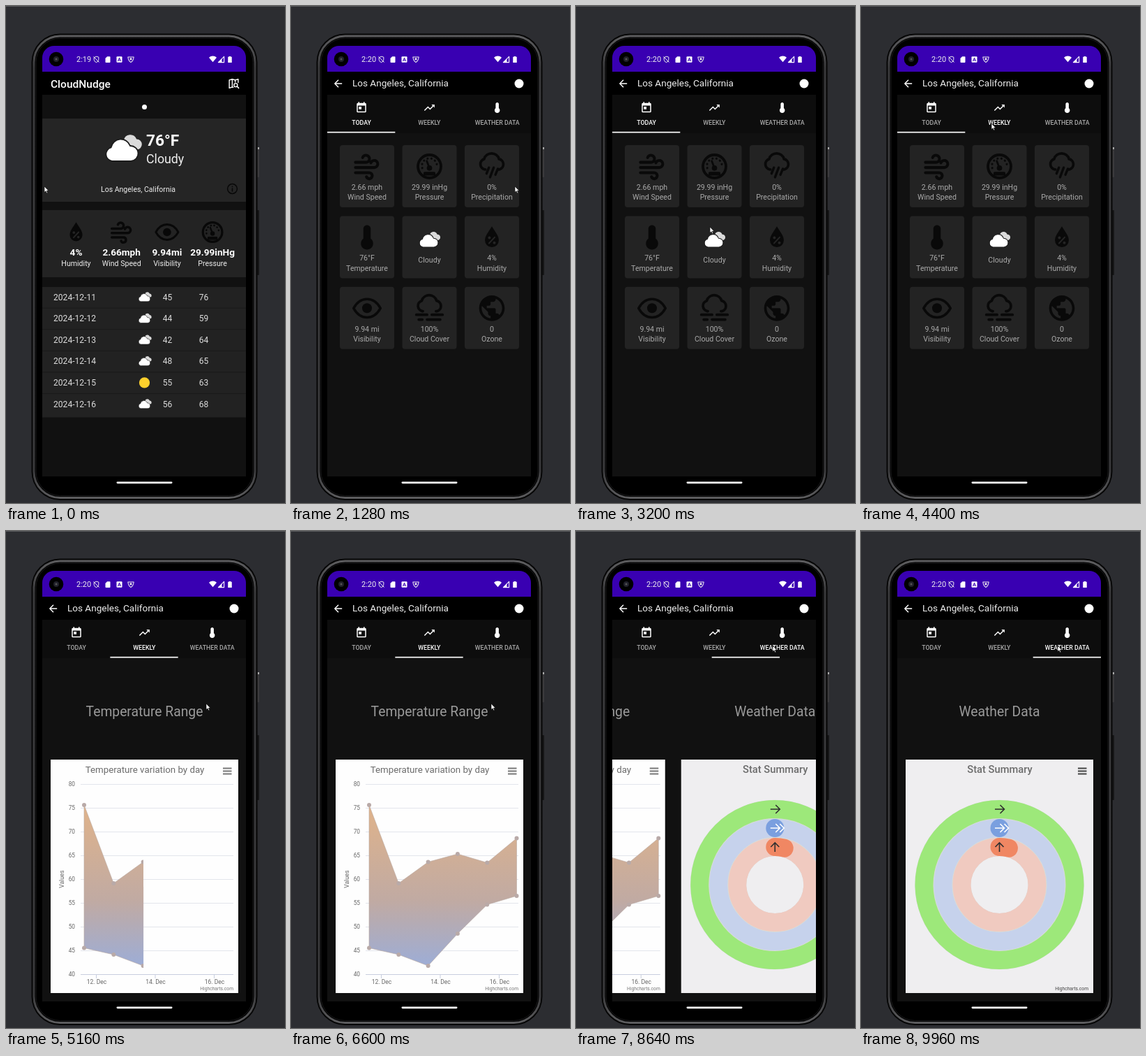
Write an HTML page that moves like this. It is 400 by 711 pixels and loops after 10000 ms.

```html
<!DOCTYPE html>
<html lang="en">
<head>
<meta charset="utf-8">
<title>Weather</title>
<style>
html, body { margin: 0; width: 100%; height: 100%; overflow: hidden; background: #2c2d31; }
svg { display: block; width: 100vw; height: 100vh; }
text { font-family: Roboto, sans-serif; }
</style>
</head>
<body>
<svg id="stage" viewBox="0 0 400 711" xmlns="http://www.w3.org/2000/svg"></svg>
<script>
const PAGE = 292, TAB = PAGE / 3, LOOP = 10000;
const CLICK = [4420, 8540];
const $ = id => document.getElementById(id);

// --- drawing helpers ---
const rect = (x, y, w, h, fill, rx = 0, more = '') =>
  `<rect x="${x}" y="${y}" width="${w}" height="${h}" rx="${rx}" fill="${fill}" ${more}/>`;
const circle = (x, y, r, fill, more = '') => `<circle cx="${x}" cy="${y}" r="${r}" fill="${fill}" ${more}/>`;
const text = (x, y, size, str, fill = '#eee', anchor = 'middle', weight = 400, more = '') =>
  `<text x="${x}" y="${y}" font-size="${size}" fill="${fill}" text-anchor="${anchor}" font-weight="${weight}" ${more}>${str}</text>`;
const line = (d, color, width = 1) =>
  `<path d="${d}" fill="none" stroke="${color}" stroke-width="${width}"/>`;
const at = (x, y, s, body) =>
  `<g transform="translate(${x} ${y}) scale(${s}) translate(-12 -12)" stroke-linecap="round" stroke-linejoin="round">${body}</g>`;
const solid = d => c => `<path d="${d}" fill="${c}" fill-rule="evenodd"/>`;

// --- icons on a 24 x 24 grid ---
const shield = 'M12 2L4 5v6c0 5 3.4 9.7 8 11 4.6-1.3 8-6 8-11V5z';
const cloudLine = 'M6.5 14.5H6a4.5 4.500 0 0 1-.5-8.700 6.500 6.500 0 0 1 12.500 0 4.500 4.500 0 0 1 .5 8.700H17.500';
const icon = {
  wind: c => line('M1.500 8.300h9.500a3.200 3.200 0 1 0-3-4.300M1.500 13h17a3.200 3.200 0 1 0-3-4.300M1.500 17.700h12.500a2.700 2.700 0 1 1-2.500 3.700', c, 2.6),
  drop: c => solid('M12 1C8.500 7 5 10.500 5 15a7 7 0 0 0 14 0c0-4.500-3.500-8-7-14z')(c) +
    line('M9.200 18l5.600-6', '#242424', 1.5) + circle(9.5, 12.5, 1.4, '#242424') + circle(14.5, 17.5, 1.4, '#242424'),
  eye: c => line('M1 12C4 6.500 8 4.500 12 4.500s8 2 11 7.500c-3 5.500-7 7.500-11 7.500S4 17.500 1 12z', c, 2) + circle(12, 12, 4, c),
  gauge: c => circle(12, 12, 10.7, 'none', `stroke="${c}" stroke-width="2.500"`) +
    `<path d="M5.300 13.500A7 7 0 1 1 18.700 13.500" fill="none" stroke="${c}" stroke-width="2" stroke-dasharray=".1 3.600"/>` +
    circle(12, 13.5, 2.5, c) + line('M12 13.500L9.500 7', c, 1.8) + rect(6.5, 17, 11, 3.5, c, 1),
  rain: c => line(cloudLine, c, 2.2) + line('M9.500 13l-2 5M13.500 13l-3 8M17 14l-2 5', c, 2),
  fog: c => line(cloudLine, c, 2.2) + line('M1 17.500h9M14 17.500h9M3 21.500h3M10 21.500h11', c, 2.2),
  thermo: solid('M15 13V5c0-1.660-1.340-3-3-3S9 3.340 9 5v8c-1.210.91-2 2.370-2 4 0 2.760 2.240 5 5 5s5-2.240 5-5c0-1.630-.79-3.090-2-4z'),
  globe: solid('M12 2C6.480 2 2 6.480 2 12s4.480 10 10 10 10-4.480 10-10S17.520 2 12 2zm-1 17.930c-3.950-.49-7-3.850-7-7.930 0-.62.08-1.210.21-1.790L9 15v1c0 1.100.9 2 2 2v1.930zm6.900-2.540c-.26-.81-1-1.390-1.900-1.390h-1v-3c0-.55-.45-1-1-1H8v-2h2c.55 0 1-.45 1-1V7h2c1.100 0 2-.9 2-2v-.41c2.930 1.190 5 4.060 5 7.410 0 2.080-.8 3.970-2.100 5.390z'),
  today: solid('M19 3h-1V1h-2v2H8V1H6v2H5a2 2 0 0 0-2 2v14a2 2 0 0 0 2 2h14a2 2 0 0 0 2-2V5a2 2 0 0 0-2-2zm0 16H5V8h14zM7 10h5v5H7z'),
  trend: solid('M16 6l2.290 2.290-4.880 4.880-4-4L2 16.590 3.410 18l6-6 4 4 6.300-6.290L22 12V6z'),
  back: solid('M20 11H7.830l5.590-5.590L12 4l-8 8 8 8 1.410-1.410L7.830 13H20z'),
  info: c => circle(12, 12, 9.2, 'none', `stroke="${c}" stroke-width="2"`) + line('M12 11.500v5M12 7.800v.1', c, 2.2),
  map: c => line('M21 10V3l-6 2-6-2-6 2v16l6-2 2 .7M9 3v16M15 5v4', c, 2) +
    circle(16, 15, 3.5, 'none', `stroke="${c}" stroke-width="2"`) + line('M18.700 17.700L22 21', c, 2.2),
  shieldOff: c => line(shield + 'M3 3l18 18', c, 2.4),
  shieldDot: c => line('M2.500 4H21.500C21 12 17 18 12 21.500 7 18 3 12 2.500 4z', c, 2.4) + circle(12, 10.5, 3.6, c),
  card: solid('M18 2h-8L4 8v12a2 2 0 0 0 2 2h12a2 2 0 0 0 2-2V4a2 2 0 0 0-2-2z'),
  wifi: solid('M12 21L24 7A17 17 0 0 0 0 7z'),
  signal: c => line('M3 21h18V3z', c, 2.4) + solid('M3 21h11V10z')(c),
  battery: solid('M9 2h6v2h3v18H6V4h3z'),
};
const draw = (name, x, y, size, color) => at(x, y, size / 24, icon[name](color));

const cloudShape = 'M10 40A10 10 0 0 1 8.500 20.500A14.500 15.500 0 0 1 36 18A11 11 0 0 1 37 40Z';
const clouds = (x, y, s) => `<g transform="translate(${x} ${y}) scale(${s}) translate(-26 -21)">
  <path d="${cloudShape}" transform="translate(21 -3.500) scale(.67)" fill="#dadada"/>
  <path d="${cloudShape}" fill="#fff" stroke="#1c1c1c" stroke-width="1.800"/></g>`;

// --- phone ---
function phone() {
  const shell = (inset, fill, more) =>
    rect(36.5 + inset, 39.5 + inset, 324 - 2 * inset, 667.5 - 2 * inset, fill, 41 - inset, more);
  return rect(0, 0, 400, 711, '#2c2d31') + rect(0, 0, 400, 1, '#57585b') +
    rect(360, 202, 3, 43, '#3b3b3d', 1) + rect(361, 202, 2, 3, '#aaa') + rect(360, 292, 3, 93, '#161617', 1) +
    shell(0, '#060606') + shell(3.5, '#000', 'stroke="url(#rim)" stroke-width="3"') +
    shell(6.5, '#000', 'stroke="#1b1b1c"');
}
function statusBar() {
  return rect(52, 57, PAGE, 37, '#3900b2') + circle(72, 76, 10.3, '#000') + circle(72, 76, 4, '#20202a') + circle(72, 76, 1.5, '#555') +
    text(101, 80, 11, '2:19', '#eee', 'start', 400, 'id="clock"') +
    draw('shieldOff', 129.5, 76.5, 10, '#eee') + draw('card', 146, 76.5, 10.5, '#fff') +
    rect(158.5, 72.3, 8, 8.4, '#fff', 1) + text(162.5, 79.2, 7.5, 'A', '#3900b2', 'middle', 700) +
    draw('shieldDot', 179, 76.5, 10.5, '#eee') + draw('wifi', 296.5, 76, 11, '#fff') +
    draw('signal', 308.5, 76.5, 11, '#fff') + draw('battery', 321, 76.5, 11, '#fff');
}

// --- overview screen ---
function home() {
  const stats = [['drop', '4%', 'Humidity', 31], ['wind', '2.66mph', 'Wind Speed', 32],
    ['eye', '9.94mi', 'Visibility', 35], ['gauge', '29.99inHg', 'Pressure', 31]];
  const days = [[45, 76], [44, 59], [42, 64], [48, 65], [55, 63], [56, 68]];
  return rect(52, 94, PAGE, 33, '#000') + text(64, 117, 15.5, 'CloudNudge', '#fff', 'start', 500) +
    draw('map', 326.5, 111, 17, '#fff') + rect(52, 127, PAGE, 546, '#111') + circle(198.5, 144.5, 3.5, '#fff') +
    rect(52, 161, PAGE, 119, '#252525') + rect(52, 292, PAGE, 96, '#232323') + clouds(168, 203, 1) +
    text(201, 200, 22.7, '76°F', '#fff', 'start', 700) + text(201, 225, 17.8, 'Cloudy', '#eee', 'start') +
    text(189.5, 266, 10.5, 'Los Angeles, California') + draw('info', 324.5, 261.5, 18, '#080808') +
    stats.map(([name, value, label, size], i) => {
      const x = 100.5 + i * 65.2;
      return draw(name, x, 323.5, size, '#080808') + text(x, 357, 13.6, value, '#fff', 'middle', 700) + text(x, 372, 10.6, label);
    }).join('') + rect(52, 402, PAGE, 186.5, '#222') +
    days.map(([low, high], i) => {
      const y = 416.5 + i * 30.6;
      return (i ? rect(52, y - 15.5, PAGE, 1, '#1a1a1a') : '') +
        text(68, y + 4, 12.1, '2024-12-' + (11 + i), '#ddd', 'start') +
        (i == 4 ? circle(198.5, y, 7.6, '#fdd02c') : clouds(199, y - .5, .36)) +
        text(231.5, y + 4, 12, low, '#ddd') + text(283.5, y + 4, 12, high, '#ddd');
    }).join('');
}

// --- detail screen ---
function todayPage() {
  const cells = [['wind', '2.66 mph', 'Wind Speed', 38], ['gauge', '29.99 inHg', 'Pressure', 37], ['rain', '0%', 'Precipitation', 41],
    ['thermo', '76°F', 'Temperature', 42], ['', '', 'Cloudy', 0], ['drop', '4%', 'Humidity', 34],
    ['eye', '9.94 mi', 'Visibility', 42], ['fog', '100%', 'Cloud Cover', 41], ['globe', '0', 'Ozone', 44]];
  return cells.map(([name, value, label, size], i) => {
    const x = 70 + i % 3 * 89.5, y = 199 + (i / 3 | 0) * 101.4, mid = x + 39;
    return rect(x, y, 78, 89, '#232323', 4) + (name
      ? draw(name, mid, y + 30.5, size, '#090909') + text(mid, y + 64, 10.6, value, '#aaa') + text(mid, y + 78.3, 10.6, label, '#aaa')
      : clouds(mid, y + 33.5, .58) + text(mid, y + 66.5, 10.6, label, '#aaa'));
  }).join('');
}
const chartCard = (title, bg, heading, size, weight, ink) =>
  text(198.5, 265, 19.3, title, '#9a9a9a') + rect(64, 327, 269, 334, bg) +
  text(199, 345.5, size, heading, '#6c6c6c', 'middle', weight) +
  line('M311 339.500h12.500M311 343.500h12.500M311 347.500h12.500', ink, 2.2) + text(326, 657, 6.7, 'Highcharts.com', ink, 'end');

function weeklyPage() {
  const highs = [392, 504, 473.5, 462, 474.5, 439.5], lows = [596.5, 606, 622, 576, 534.5, 522];
  const pts = ys => ys.map((y, i) => [112 + i * 42.3, y]);
  const all = [...pts(highs), ...pts(lows).reverse()];
  let grid = '';
  for (let v = 40, y = 634; v <= 80; v += 5, y -= 34)
    grid += line(`M107 ${y}.500H326`, v == 40 ? '#c8cede' : '#e3e5ec') + text(99, y + 3, 8.3, v, '#666', 'end');
  return chartCard('Temperature Range', '#fefefe', 'Temperature variation by day', 13.3, 400, '#777') + grid +
    [12, 14, 16].map((d, i) => line(`M${129.5 + i * 84.5} 635v5`, '#c8cede') + text(130 + i * 84.5, 648, 8.5, d + '. Dec', '#666')).join('') +
    text(0, 0, 8.5, 'Values', '#666', 'middle', 400, 'transform="translate(83 498) rotate(-90)"') +
    `<g clip-path="url(#reveal)"><polygon points="${all}" fill="url(#heat)" stroke="#b9a8a0" stroke-width=".6"/>` +
    all.map(([x, y]) => circle(x, y, 3, '#b9aaa8')).join('') + '</g>';
}
function statPage() {
  const ring = (r, color) => circle(198.5, 506, r, 'none', `stroke="${color}" stroke-width="26"`);
  const a = .04 * 2 * Math.PI, endX = 198.5 + 54 * Math.sin(a), endY = 506 - 54 * Math.cos(a);
  const mark = (x, y, d, color) => `<g transform="translate(${x} ${y})">${line(d, color, 1.6)}</g>`;
  return chartCard('Weather Data', '#efeef0', 'Stat Summary', 14.7, 500, '#444') +
    circle(198.5, 506, 121.3, '#d8dcd8') + circle(198.5, 506, 41, '#efeef0') +
    ring(108, '#9de87a') + ring(81, '#c6d2ec') + ring(54, '#f0cac0') + circle(198.5, 425, 13, '#7a9fdf') +
    `<path d="M198.500 452A54 54 0 0 1 ${endX} ${endY}" fill="none" stroke="#f08763" stroke-width="26" stroke-linecap="round"/>` +
    mark(198.5, 398, 'M-6.500 0H7M1-6L7 0L1 6', '#303030') +
    mark(198.5, 425, 'M-6.500 0H7M1-6L7 0L1 6M7-6L13 0L7 6', '#fff') +
    mark(198.5, 452, 'M0 7V-6M-6 0L0-6L6 0', '#303030');
}
function detail() {
  const tabs = [['today', 'TODAY'], ['trend', 'WEEKLY'], ['thermo', 'WEATHER DATA']];
  return rect(52, 94, PAGE, 33, '#000') + draw('back', 67.5, 111, 17, '#fff') +
    text(88, 115, 13.55, 'Los Angeles, California', '#eee', 'start') + circle(327, 111, 6.5, '#fff') +
    rect(52, 127, PAGE, 546, '#111') + rect(52, 127, PAGE, 55, '#0d0d0d') +
    tabs.map(([name, label], i) => draw(name, 101 + i * TAB, 145.5, 18, '#fff') +
      text(101 + i * TAB, 170, 8.8, label, '#aaa', 'middle', 500, `id="tab${i}"`)).join('') +
    rect(52, 179.8, TAB, 1.7, '#fff', 0, 'id="indicator"') +
    [todayPage, weeklyPage, statPage].map((page, i) => `<g id="page${i}">${page()}</g>`).join('');
}

$('stage').innerHTML = `<defs>
  <clipPath id="screen">${rect(52, 57, PAGE, 637, '#000', 17)}</clipPath>
  <clipPath id="reveal"><rect id="revealBox" x="104" y="350" width="0" height="290"/></clipPath>
  <linearGradient id="rim" x1="0" y1="0" x2="0" y2="1">
    <stop stop-color="#5c5c5e"/><stop offset=".07" stop-color="#39393b"/>
    <stop offset=".94" stop-color="#39393b"/><stop offset="1" stop-color="#5c5c5e"/>
  </linearGradient>
  <linearGradient id="heat" x1="0" y1="392" x2="0" y2="622" gradientUnits="userSpaceOnUse">
    <stop stop-color="#e0b38a"/><stop offset=".6" stop-color="#c0aaa3"/><stop offset="1" stop-color="#9dadd6"/>
  </linearGradient></defs>
  ${phone()}<g clip-path="url(#screen)">${statusBar()}<g id="home">${home()}</g><g id="detail">${detail()}</g>
  ${rect(52, 673, PAGE, 21, '#000')}${rect(158.5, 680.4, 80, 2.8, '#fff', 1.4)}</g>
  <path id="cursor" d="M0 0V8.500L2 6.800 3.400 9.800 4.700 9.200 3.400 6.300H6z" fill="#fff" stroke="#000" stroke-width=".6"/>`;

// --- motion ---
const clamp = x => Math.min(1, Math.max(0, x));
const smooth = x => x * x * (3 - 2 * x);
const decelerate = x => 1 - (1 - x) ** 2;
const sine = x => (1 - Math.cos(Math.PI * x)) / 2;
// cubic-bezier(.4, 0, .2, 1)
function fastOutSlowIn(x) {
  let lo = 0, hi = 1, u;
  for (let i = 0; i < 20; i++) {
    u = (lo + hi) / 2;
    if (1.2 * u * (1 - u) ** 2 + .6 * u * u * (1 - u) + u ** 3 < x) lo = u; else hi = u;
  }
  return 3 * u * u * (1 - u) + u ** 3;
}
const steps = (t, duration, ease) => CLICK.reduce((sum, c) => sum + ease(clamp((t - c) / duration)), 0);

// time, x, y
const route = [[0, 55, 258], [200, 55, 258], [900, 321, 258], [1350, 321, 258], [1800, 192, 316], [3750, 192, 316],
  [4340, 187, 168], [4500, 187, 168], [5050, 287, 247], [7900, 287, 247], [8420, 282, 164], [LOOP, 282, 164]];
function pointer(t) {
  const i = route.findIndex(p => p[0] > t), [t0, x0, y0] = route[i - 1], [t1, x1, y1] = route[i];
  const k = smooth((t - t0) / (t1 - t0));
  return [x0 + (x1 - x0) * k, y0 + (y1 - y0) * k];
}

function render(t) {
  const opened = t >= 1240;
  $('home').style.display = opened ? 'none' : '';
  $('detail').style.display = opened ? '' : 'none';
  $('clock').textContent = opened ? '2:20' : '2:19';
  const scroll = steps(t, 222, decelerate);
  const active = CLICK.filter(c => t >= c - 40).length;
  for (let i = 0; i < 3; i++) {
    $('page' + i).setAttribute('transform', `translate(${(i - scroll) * PAGE} 0)`);
    $('tab' + i).setAttribute('fill', i == active ? '#fff' : '#aaa');
  }
  $('indicator').setAttribute('x', 52 + TAB * steps(t, 300, fastOutSlowIn));
  $('revealBox').setAttribute('width', 224 * sine(clamp((t - 4715) / 1000)));
  $('cursor').setAttribute('transform', `translate(${pointer(t)})`);
}
const start = performance.now();
function frame() {
  render((performance.now() - start) % LOOP);
  requestAnimationFrame(frame);
}
render(0);
requestAnimationFrame(frame);
</script>
</body>
</html>
```
